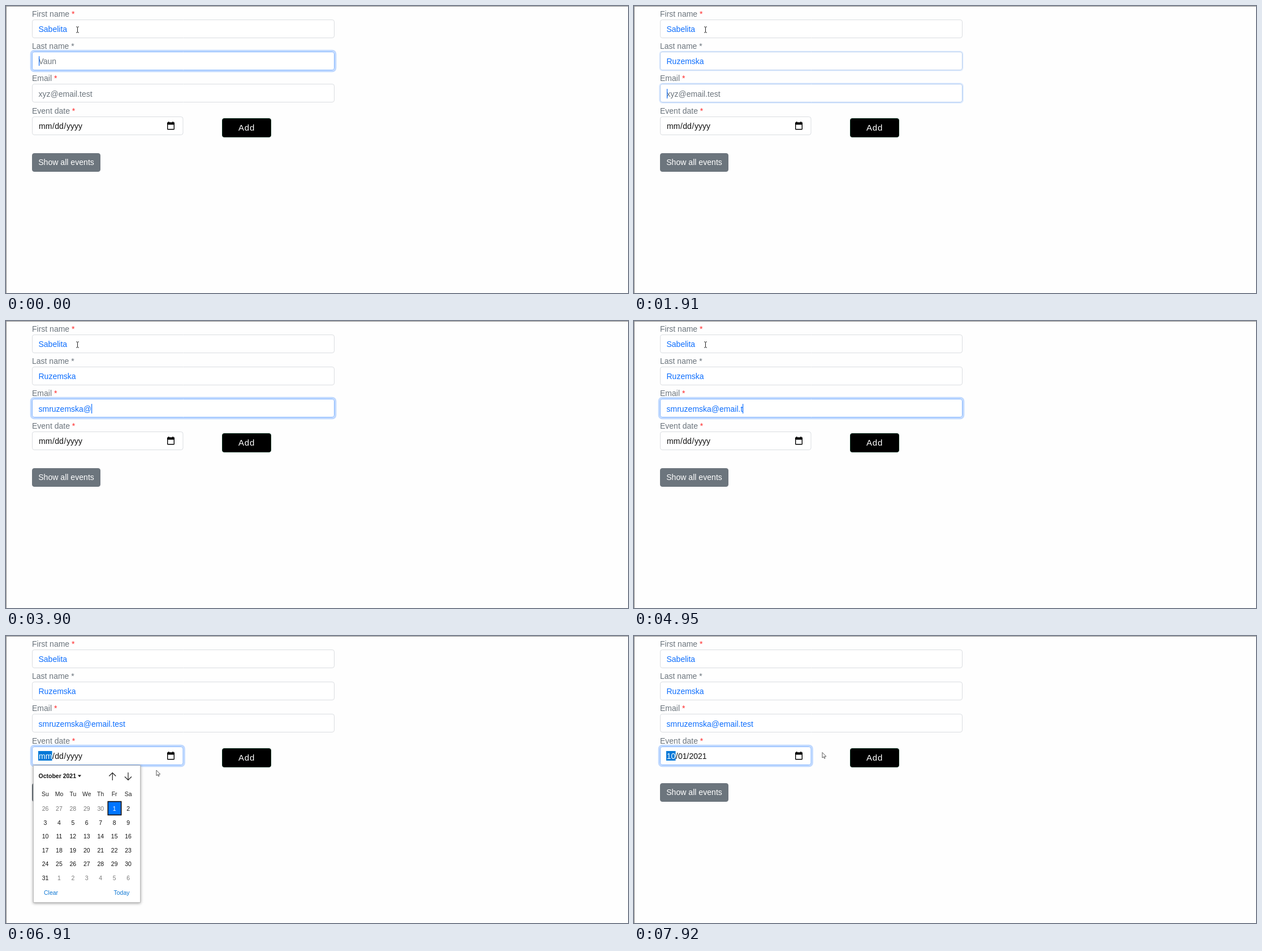
Recreate the animation shown at these times as an HTML page with a canvas. Size 1100x509 px, loop 8000 ms.

```html
<!DOCTYPE html>
<html lang="en">
<head>
<meta charset="utf-8">
<title>Event form</title>
<style>
  html, body { margin: 0; width: 100%; height: 100%; overflow: hidden; background: #fefefe; }
  canvas { display: block; width: 1100px; height: 509px; }
</style>
</head>
<body>
<canvas id="stage" width="1100" height="509"></canvas>
<script>
const ctx = document.getElementById('stage').getContext('2d');
const LOOP = 8000;
const FAMILY = '"Liberation Sans", Arial, sans-serif';
const GREY = '#6c757d', BLUE = '#0d6efd', PICK = '#0078d7', RED = '#ff2f2f';

const FIRST = 'Sabelita', LAST = 'Ruzemska', MAIL = 'smruzemska@email.test';

// [time, characters typed so far]
const LAST_KEYS = [[410, 1], [640, 2], [760, 3], [890, 5], [1150, 6], [1520, 7], [1660, 8]];
const MAIL_KEYS = [[2300, 1], [2420, 2], [2570, 3], [2700, 4], [2830, 5], [2960, 7],
  [3240, 8], [3370, 9], [3490, 10], [3900, 11], [4150, 12], [4270, 13], [4410, 14],
  [4690, 15], [4820, 17], [4950, 18], [5080, 20], [5210, 21]];
// [time, focus strength]
const LAST_FOCUS = [[0, 1], [1910, 0.45], [2040, 0]];
const MAIL_FOCUS = [[1910, 0.55], [2040, 1], [6520, 0.75], [6670, 0]];
const DATE_FOCUS = [[6520, 0.2], [6670, 1]];

const OPEN = 6790, PICKED = 7670, LEAVE = 7920;

function stepAt(keys, t) {
  let value = 0;
  for (const [time, v] of keys) if (t >= time) value = v;
  return value;
}

const mix = (a, b, k) => a + (b - a) * k;

function glide(t, start, tick, count, from, to) {
  const n = Math.min(count, Math.floor((t - start) / tick) + 1);
  const p = n / count, e = p * p * (3 - 2 * p);
  return [mix(from[0], to[0], e), mix(from[1], to[1], e)];
}

function pointerAt(t) {
  const rest = [126, 42], icon = [292, 215], day = [191.5, 304];
  if (t < 5800) return rest;
  if (t < 6670) return glide(t, 5800, 120, 7, rest, icon);
  if (t < LEAVE) return glide(t, 6670, 122, 6, icon, day);
  return [333, 206.5];
}

function text(s, x, y, color, size = 14, align = 'left', weight = 'normal') {
  ctx.font = `${weight} ${size}px ${FAMILY}`;
  ctx.textAlign = align;
  ctx.fillStyle = color;
  ctx.fillText(s, x, y);
  return ctx.measureText(s).width;
}

function rounded(x, y, w, h, r) {
  ctx.beginPath();
  ctx.roundRect(x, y, w, h, r);
}

function path(points, closed) {
  ctx.beginPath();
  points.forEach(([x, y], i) => i ? ctx.lineTo(x, y) : ctx.moveTo(x, y));
  if (closed) ctx.closePath();
}

function label(s, y, starColor) {
  const w = text(s + ' ', 46, y, GREY);
  text('*', 46 + w, y, starColor);
}

function field(y, w, focus) {
  const x = 46.5, spread = 3.3 * focus;
  if (focus) {
    ctx.lineWidth = spread;
    ctx.strokeStyle = `rgba(13,110,253,${0.26 * focus})`;
    rounded(x - 0.5 - spread / 2, y - spread / 2, w + 1 + spread, 33 + spread, 4 + spread / 2);
    ctx.stroke();
  }
  rounded(x, y + 0.5, w, 32, 3.6);
  ctx.fillStyle = '#fff';
  ctx.fill();
  ctx.lineWidth = 1;
  ctx.strokeStyle = `rgb(${mix(218, 134, focus)},${mix(221, 183, focus)},${mix(225, 254, focus)})`;
  ctx.stroke();
}

function entry(value, hint, y, active) {
  if (!value) text(hint, 57.5, y, GREY);
  const w = value ? text(value, 57.5, y, BLUE) : 0;
  if (active) {
    ctx.fillStyle = BLUE;
    ctx.fillRect(Math.round(57.5 + w), y - 14, 1.2, 17);
  }
}

function button(s, x, y, w, h, fill, edge, size, spacing) {
  rounded(x + 0.5, y + 0.5, w - 1, h - 1, 3.4);
  ctx.fillStyle = fill;
  ctx.fill();
  ctx.lineWidth = 1;
  ctx.strokeStyle = edge;
  ctx.stroke();
  ctx.letterSpacing = spacing + 'px';
  text(s, x + w / 2, Math.floor(y + h / 2 + 5), '#fff', size, 'center');
  ctx.letterSpacing = '0px';
}

function dateValue(t) {
  const done = t >= PICKED, y = 218;
  const parts = done ? ['10', '/', '01', '/', '2021'] : ['mm', '/', 'dd', '/', 'yyyy'];
  const xs = done ? [57.8, 73.7, 78, 93.3, 97.5] : [58, 82, 86.3, 102.5, 107];
  const selected = t >= 6520;
  if (selected) {
    ctx.fillStyle = PICK;
    ctx.fillRect(57, y - 14, done ? 16.5 : 24.5, 17);
  }
  parts.forEach((s, i) => text(s, xs[i], y, selected && !i ? '#fff' : '#111'));
}

function calendarIcon() {
  ctx.fillStyle = '#000';
  ctx.fillRect(285, 206.5, 13, 4);
  ctx.fillRect(287, 205, 1.6, 2);
  ctx.fillRect(294.4, 205, 1.6, 2);
  ctx.strokeStyle = '#000';
  ctx.lineWidth = 1.4;
  rounded(285.7, 207.2, 11.6, 11.6, 0.8);
  ctx.stroke();
}

function monthArrow(x, dir) {
  ctx.strokeStyle = '#222';
  ctx.lineWidth = 1.2;
  const tip = 249 - 6.5 * dir;
  path([[x, 249 + 7 * dir], [x, tip]]);
  ctx.stroke();
  path([[x - 6, tip + 6 * dir], [x, tip], [x + 6, tip + 6 * dir]]);
  ctx.stroke();
}

function picker() {
  ctx.save();
  ctx.shadowColor = 'rgba(0,0,0,0.4)';
  ctx.shadowBlur = 5;
  ctx.shadowOffsetY = 1;
  ctx.fillStyle = '#fff';
  ctx.fillRect(48, 229, 190, 244);
  ctx.restore();
  ctx.lineWidth = 1;
  ctx.strokeStyle = '#bfbfbf';
  ctx.strokeRect(48.5, 229.5, 189, 243);

  const size = 10.5;
  text('October 2021', 57.5, 252, '#111', size, 'left', 'bold');
  path([[127, 246.5], [133, 246.5], [130, 250.3]], true);
  ctx.fillStyle = '#111';
  ctx.fill();
  monthArrow(188.3, 1);
  monthArrow(216, -1);

  const colX = i => 69.5 + 24.43 * i;
  ['Su', 'Mo', 'Tu', 'We', 'Th', 'Fr', 'Sa'].forEach((d, i) =>
    text(d, colX(i), 284, '#222', size, 'center'));

  ctx.fillStyle = '#0075ff';
  ctx.fillRect(180, 293, 24, 25);
  ctx.lineWidth = 1.6;
  ctx.strokeStyle = '#101010';
  ctx.strokeRect(180.3, 293.6, 23.4, 23.8);

  for (let i = 0; i < 42; i++) {
    const n = i - 4;
    const inside = n >= 1 && n <= 31;
    const day = n < 1 ? n + 30 : n > 31 ? n - 31 : n;
    const color = n === 1 ? '#fff' : inside ? '#111' : '#7a7a7a';
    const y = Math.round(310.3 + 24.45 * Math.floor(i / 7));
    text(day, colX(i % 7), y, color, size, 'center');
  }
  text('Clear', 67, 459, '#0f78d4', size);
  text('Today', 218.5, 459, '#0f78d4', size, 'right');
}

function beam(x, y) {
  ctx.strokeStyle = '#222';
  ctx.lineWidth = 1;
  x = Math.round(x) + 0.5;
  y = Math.round(y);
  path([[x, y - 4.5], [x, y + 4.5]]);
  ctx.stroke();
  for (const s of [-1, 1]) {
    path([[x - 2.5, y + 5 * s], [x - 0.8, y + 5 * s], [x, y + 4.3 * s],
      [x + 0.8, y + 5 * s], [x + 2.5, y + 5 * s]]);
    ctx.stroke();
  }
}

function arrow(x, y) {
  path([[0, 0], [0, 9.6], [2.2, 7.7], [3.7, 10.8], [5.1, 10.1], [3.7, 7.2], [6.8, 7]]
    .map(([dx, dy]) => [x + dx, y + dy]), true);
  ctx.fillStyle = '#fff';
  ctx.fill();
  ctx.lineWidth = 0.8;
  ctx.strokeStyle = '#333';
  ctx.stroke();
}

function pointer(t) {
  const [x, y] = pointerAt(t);
  const overField = t < 6520 && x < 581 && [24, 81, 138].some(top => y >= top && y <= top + 33);
  (overField ? beam : arrow)(x, y);
}

function draw(t) {
  ctx.fillStyle = '#fefefe';
  ctx.fillRect(0, 0, 1100, 509);
  ctx.fillStyle = '#8c8c8c';
  ctx.fillRect(0, 0, 1100, 1);
  ctx.fillRect(0, 0, 1, 509);

  label('First name', 19, RED);
  label('Last name', 76, GREY);
  label('Email', 133, RED);
  label('Event date', 191, RED);

  field(24, 534, 0);
  field(81, 534, stepAt(LAST_FOCUS, t));
  field(138, 534, stepAt(MAIL_FOCUS, t));
  field(196, 266.5, stepAt(DATE_FOCUS, t));

  entry(FIRST, '', 46, false);
  entry(LAST.slice(0, stepAt(LAST_KEYS, t)), 'Vaun', 103, t < 1910);
  entry(MAIL.slice(0, stepAt(MAIL_KEYS, t)), 'xyz@email.test', 161, t >= 1910 && t < 6520);
  dateValue(t);
  calendarIcon();

  button('Add', 382, 199, 87, 34, '#000', '#0c2f1f', 15, 0.8);
  button('Show all events', 46, 261, 121, 33, GREY, GREY, 14.1, 0);

  if (t >= OPEN && t < PICKED) picker();
  pointer(t);
}

const begin = performance.now();
function tick() {
  draw((performance.now() - begin) % LOOP);
  requestAnimationFrame(tick);
}
tick();
</script>
</body>
</html>
```
